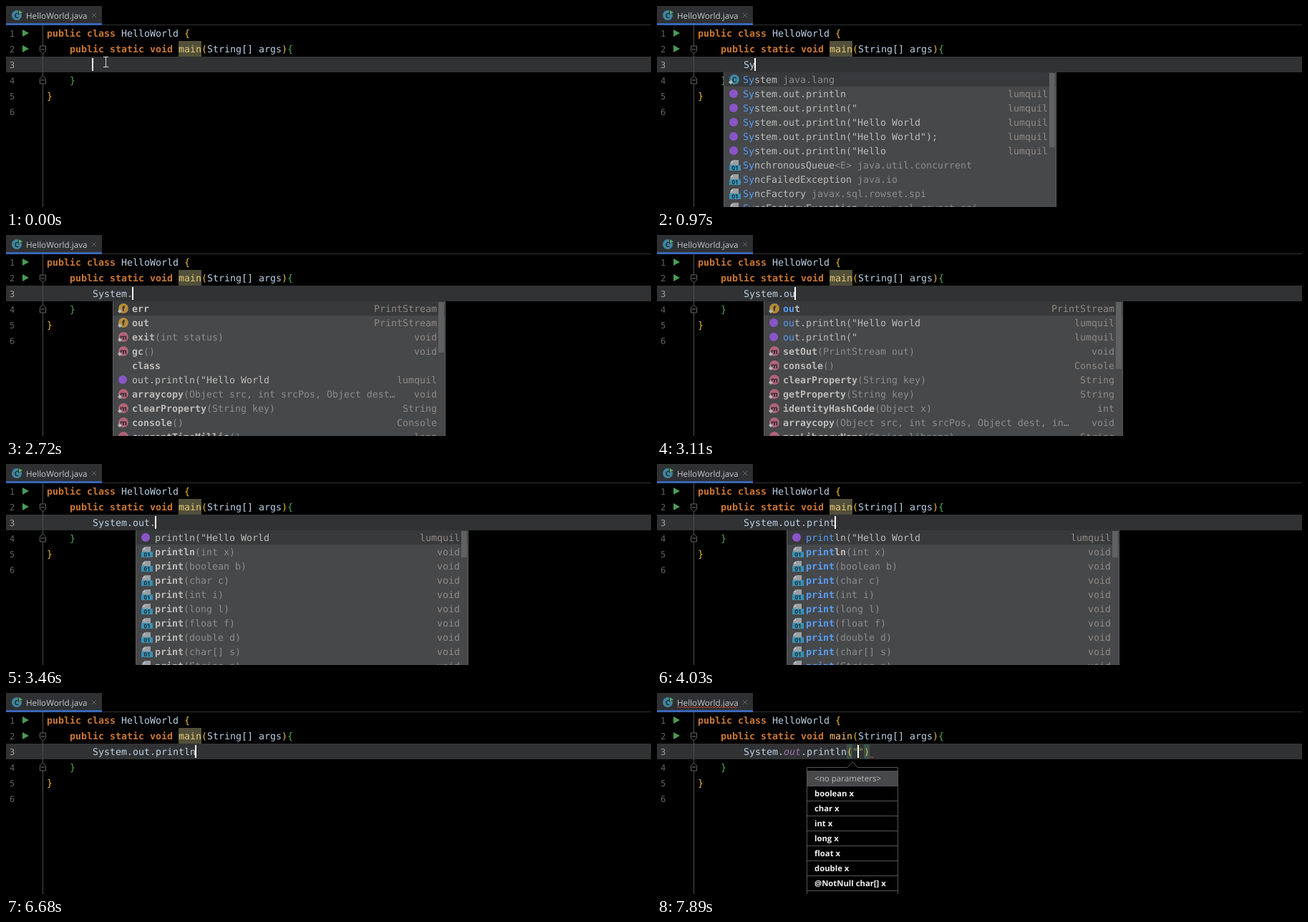
An HTML page with a canvas that plays this animation: 901x282 px, repeating every 8 s.

```html
<!DOCTYPE html>
<html lang="en">
<head>
<meta charset="utf-8">
<title>Code completion</title>
<style>
html, body { margin: 0; width: 100%; height: 100%; overflow: hidden; background: #000; }
canvas { display: block; }
</style>
</head>
<body>
<canvas id="stage" width="901" height="282"></canvas>
<script>
const ctx = document.getElementById('stage').getContext('2d');
const LOOP = 8000;
const MONO = '13.29px "DejaVu Sans Mono", monospace';
const SANS = '"Open Sans", "Noto Sans", sans-serif';
const PLAIN = '#b9d0e6', KEY = '#cc7832', GOLD = '#e8ba36', GREEN = '#54a857';

const TYPED = 'System.out.println';
const KEY_TIMES = [430, 840, 1070, 1500, 1770, 1970, 2580, 2930, 3060, 3200, 3330,
  3530, 3660, 3800, 3900, 4030, 4230, 4370];

// Each row: icon | name | tail | right column. Capital icons carry a static marker.
const rows = text => text.trim().split('\n').map(row => row.split('|'));
const ASSIST = `
C|System| java.lang
h|System.out.println||lumquil
h|System.out.println("||lumquil
h|System.out.println("Hello World||lumquil
h|System.out.println("Hello World");||lumquil
h|System.out.println("Hello||lumquil
`;
const SYSTEM_TYPES = `j|SystemColor| java.awt
j|SystemTray| java.awt
j|SystemFlavorMap| java.awt.datatransfer
j|SystemSleepEvent| java.awt.desktop`;

const types = text => ({ x: 93, w: 465, thumb: 104, rows: rows(text) });
const listS = types(`
C|String| java.lang
C|System| java.lang
C|Short| java.lang
h|System.out.println||lumquil
h|System.out.println("||lumquil
h|System.out.println("Hello World||lumquil
j|Set<E>| java.util
j|Scanner| java.util
j|Stack<E>| java.util
j|Stream<T>| java.util.stream`);
const listSy = types(ASSIST + `j|SynchronousQueue|<E> java.util.concurrent
j|SyncFailedException| java.io
j|SyncFactory| javax.sql.rowset.spi
j|SyncFactoryException| javax.sql.rowset.spi`);
const listSys = types(ASSIST + SYSTEM_TYPES);
const listMembers = { x: 149, w: 465, thumb: 71, bold: true, rows: rows(`
F|err||PrintStream
F|out||PrintStream
M|exit|(int status)|void
M|gc|()|void
-|class||
h|out.println("Hello World||lumquil
M|arraycopy|(Object src, int srcPos, Object dest…|void
M|clearProperty|(String key)|String
M|console|()|Console
M|currentTimeMillis|()|long`) };
const listO = { x: 149, w: 502, thumb: 94, bold: true, rows: rows(`
F|out||PrintStream
h|out.println("Hello World||lumquil
h|out.println("||lumquil
M|setOut|(PrintStream out)|void
M|console|()|Console
M|clearProperty|(String key)|String
M|getProperty|(String key)|String
M|identityHashCode|(Object x)|int
M|arraycopy|(Object src, int srcPos, Object dest, in…|void
M|mapLibraryName|(String libname)|String`) };
const listPrint = { x: 181, w: 465, thumb: 37, bold: true, rows: rows(`
h|println("Hello World||lumquil
j|println|(int x)|void
` + ['boolean b', 'char c', 'int i', 'long l', 'float f', 'double d', 'char[] s', 'String s']
    .map(arg => `j|print|(${arg})|void`).join('\n')) };
const listPrintln = { x: 181, w: 465, thumb: 94, bold: true, rows:
  ['int x', 'char x', 'long x', 'float x', 'char[] x', 'double x', 'Object x', 'String x', 'boolean x', '']
    .map(arg => ['m', 'println', `(${arg})`, 'void']) };

// time, list, opacity
const POPUPS = [[0], [600, listS, .5], [700, listS, 1], [840, listSy, 1], [1070, listSys, 1], [2580],
  [2720, listMembers, 1], [2930, listO, 1], [3330], [3400, listPrint, .5], [3460, listPrint, 1],
  [4230, listPrintln, 1], [6640, listPrintln, .5], [6680]];
const PARAMS = ['<no parameters>', 'boolean x', 'char x', 'int x', 'long x', 'float x', 'double x',
  '@NotNull char[] x'];

function rect(x, y, w, h, color) {
  ctx.fillStyle = color;
  ctx.fillRect(x, y, w, h);
}

function path(points, { fill, stroke, close = !!fill }) {
  ctx.beginPath();
  points.forEach(([x, y]) => ctx.lineTo(x, y));
  if (close) ctx.closePath();
  if (fill) { ctx.fillStyle = fill; ctx.fill(); }
  if (stroke) { ctx.strokeStyle = stroke; ctx.lineWidth = 1; ctx.stroke(); }
}

function disc(x, y, r, color) {
  ctx.fillStyle = color;
  ctx.beginPath();
  ctx.arc(x, y, r, 0, 7);
  ctx.fill();
}

function label(text, x, y, color, font, align = 'left') {
  ctx.font = font;
  ctx.textAlign = align;
  ctx.fillStyle = color;
  ctx.fillText(text, x, y);
}

// Runs of [text, colour, style] on the 8 px character grid.
function code(x, y, ...runs) {
  for (const [text, color, style = ''] of runs) {
    label(text, x, y, color, `${style} ${MONO}`);
    x += text.length * 8;
  }
}

function squiggle(x1, x2, y) {
  const points = [];
  for (let x = x1, i = 0; x <= x2; x += 2, i++) points.push([x, y + (i % 2 ? -1 : 1)]);
  path(points, { stroke: '#bc3f3c' });
}

function letterDisc(x, y, letter, color) {
  disc(x, y, 7, color);
  label(letter, x, y + 3.5, '#25282a', `bold 10px ${SANS}`, 'center');
}

function icon(kind, x, y) {
  const type = kind.toLowerCase();
  if (type === 'h') disc(x - 1, y, 6, '#8a55c8');
  if (type === 'c') letterDisc(x, y, 'C', '#3e86a0');
  if (type === 'f') letterDisc(x, y, 'f', '#b5893b');
  if (type === 'm') letterDisc(x, y, 'm', '#b06478');
  if (type === 'j') {
    path([[x - 1, y - 7], [x + 6, y - 7], [x + 6, y], [x - 6, y], [x - 6, y - 2]], { fill: '#9aa0a4' });
    path([[x - 6, y - 3], [x - 2, y - 7], [x - 2, y - 3]], { fill: '#c0c4c6' });
    rect(x - 7, y, 16, 8, '#3a90b4');
    label('01', x + 1, y + 7, '#1f2b31', `bold 8px ${SANS}`, 'center');
  }
  if (kind !== type)
    path([[x - 5, y + 1], [x - 2, y + 4], [x - 5, y + 7], [x - 8, y + 4]], { fill: '#b4b8ba' });
}

function drawTab(error) {
  rect(0, 26, 901, 1, '#323232');
  rect(0, 0, 134, 26, '#2e3032');
  rect(0, 24, 134, 3, '#3a66b8');
  letterDisc(15, 13, 'C', '#3e86a0');
  path([[17, 5], [24, 9], [17, 13]], { fill: '#2e3032' });
  path([[18, 6], [23, 9], [18, 12]], { fill: '#59a869' });
  label('HelloWorld.java', 28, 18, '#c4c8cb', `11.7px ${SANS}`);
  path([[120, 10], [126, 16]], { stroke: '#626567' });
  path([[126, 10], [120, 16]], { stroke: '#626567' });
  if (error) squiggle(28, 112, 20);
}

function drawEditor(t) {
  rect(0, 71, 901, 22, '#313233');
  rect(51, 27, 1, 255, '#4b4d4e');
  for (let n = 1; n <= 6; n++)
    label(n, 5, 21 + n * 22, n === 3 ? '#a4a3a3' : '#606366', '12px "DejaVu Sans Mono", monospace');
  for (const y of [38, 60]) path([[23, y - 5], [32, y], [23, y + 5]], { fill: '#499c54' });
  for (const [y, s] of [[61, 1], [104, -1]]) {
    path([[47.5, y - 5 * s], [55.5, y - 5 * s], [55.5, y + 2 * s], [51.5, y + 6 * s], [47.5, y + 2 * s]],
      { fill: '#000', stroke: '#636567' });
    rect(49, y - .5, 5, 1, '#7a7c7e');
  }
  if (t < 7420) rect(241, 49, 32, 22, '#52503a');
  code(57, 43, ['public class ', KEY, 'bold'], ['HelloWorld ', PLAIN], ['{', GOLD]);
  code(89, 65, ['public static void ', KEY, 'bold'], ['main', t < 7420 ? '#e6c877' : '#ffc66d'],
    ['(', GOLD], ['String[] args', PLAIN], [')', GOLD], ['{', GREEN]);
  code(89, 109, ['}', GREEN]);
  code(57, 131, ['}', GOLD]);
}

function drawTyping(t) {
  const count = KEY_TIMES.filter(time => time <= t).length;
  const called = t >= 7010, quoted = t >= 7760;
  let caret = 121 + count * 8;
  if (called) {
    const close = quoted ? 289 : 273;
    rect(265, 72, 8, 20, '#3b514d');
    rect(close, 72, 8, 20, '#3b514d');
    code(121, 87, ['System.', PLAIN], ['out', '#9876aa', 'italic'], ['.println', PLAIN], ['(', GOLD],
      [quoted ? '""' : '', '#8a9a5b'], [')', GOLD]);
    squiggle(close + 8, close + 15, 90);
    caret += quoted ? 16 : 8;
  } else code(121, 87, [TYPED.slice(0, count), PLAIN]);

  const hidden = [[130, 430], [5140, 5640], [6130, 6640]].some(([a, b]) => t >= a && t < b);
  if (!hidden) rect(caret - 1, 73, 2, 18, '#fff');
  if (t < 430) {
    rect(139, 71, 1, 15, '#ddd');
    for (const y of [71, 85]) {
      rect(136, y, 3, 1, '#ddd');
      rect(140, y, 3, 1, '#ddd');
    }
  }
  return TYPED.slice(0, count).split('.').pop();
}

function drawPopup(t, prefix) {
  const [, list, alpha] = POPUPS.findLast(([time]) => time <= t);
  if (!list) return;
  const { x, w, thumb, bold } = list;
  ctx.globalAlpha = alpha;
  rect(x, 93, w, 189, '#5a5c5e');
  rect(x + 1, 93, w - 2, 189, '#46484a');
  rect(x + 1, 93, w - 2, 20, '#37393b');
  rect(x + w - 10, 94, 8, thumb, '#5f6163');
  list.rows.forEach(([kind, name, tail, right = ''], i) => {
    const y = 103 + i * 20;
    const hit = name.startsWith(prefix) ? prefix.length : 0;
    const style = bold && kind !== 'h' ? 'bold' : '';
    icon(kind, x + 15, y);
    code(x + 27, y + 5, [name.slice(0, hit), '#589df6', style], [name.slice(hit), '#bebbb8', style],
      [tail, '#8c8c8c']);
    code(x + w - 12 - right.length * 8, y + 5, [right, '#918984']);
  });
  ctx.globalAlpha = 1;
}

function drawParams(t) {
  if (t < 7830) return;
  ctx.globalAlpha = t < 7890 ? .5 : 1;
  path([[209.5, 290], [209.5, 104.5], [266, 104.5], [273, 96.5], [280, 104.5], [336.5, 104.5], [336.5, 290]],
    { fill: '#000', stroke: '#545658' });
  rect(210, 109, 126, 21, '#46484a');
  PARAMS.forEach((text, i) => {
    const y = 109 + i * 21;
    rect(210, y + 21, 126, 1, '#545658');
    label(text, 220, y + 15, i ? '#f2f2f2' : '#bbb', `${i ? 'bold 11.3px' : '11.6px'} ${SANS}`);
  });
  ctx.globalAlpha = 1;
}

function draw() {
  const t = performance.now() % LOOP;
  rect(0, 0, 901, 282, '#000');
  drawTab(t >= 7010);
  drawEditor(t);
  drawPopup(t, drawTyping(t));
  drawParams(t);
  requestAnimationFrame(draw);
}

ctx.textRendering = 'geometricPrecision';
draw();
</script>
</body>
</html>
```
